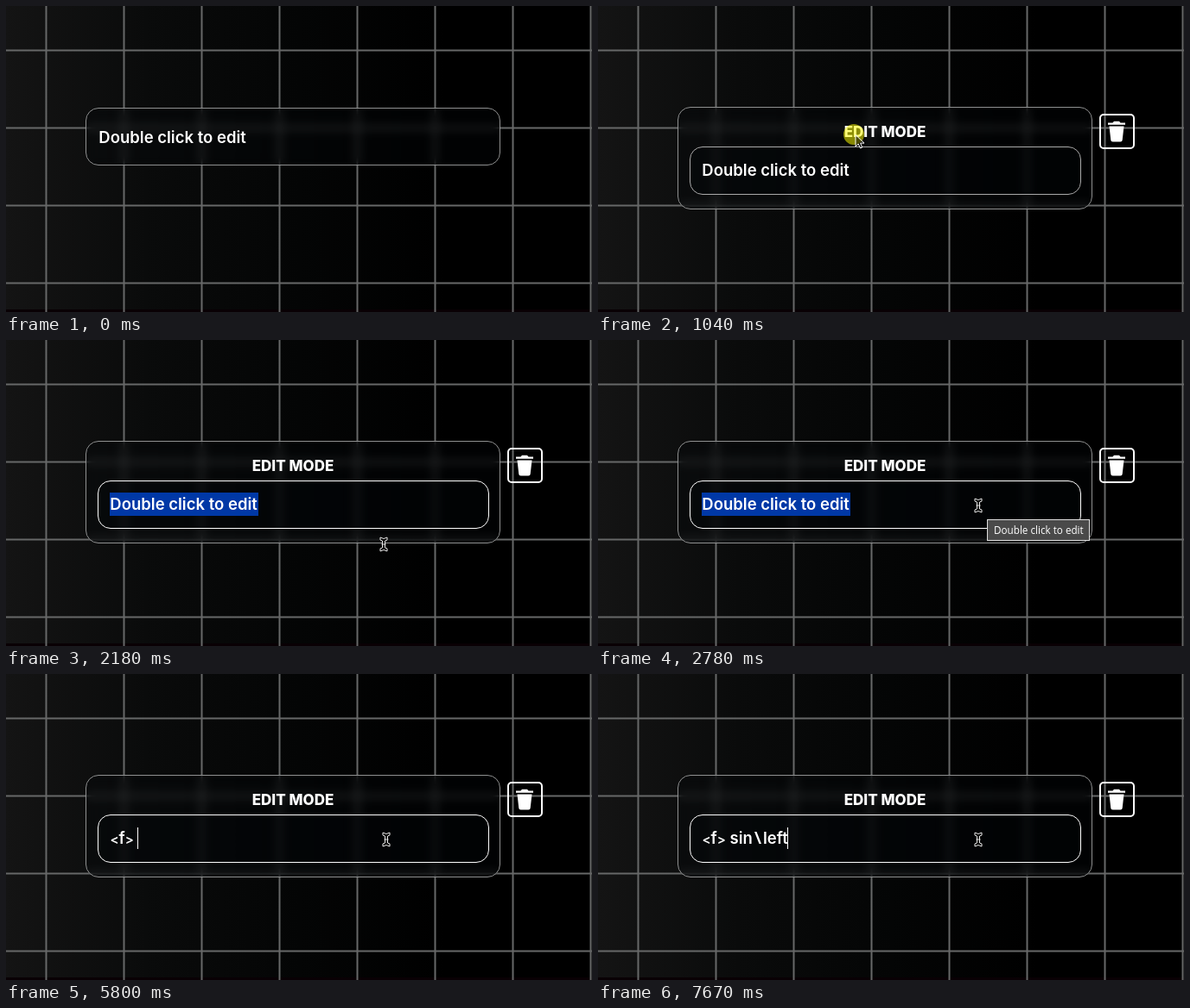
Recreate the animation shown at these times as an HTML page. Size 678 px wide and 355 px high, loop 8000 ms.

```html
<!DOCTYPE html>
<html lang="en">
<head>
<meta charset="utf-8">
<title>Edit mode</title>
<style>
html, body { margin: 0; width: 100%; height: 100%; overflow: hidden; background: #000; }
#stage {
  position: relative; width: 678px; height: 355px; overflow: hidden;
  background: linear-gradient(90deg, #141414 0, #0a0b0b 24%, #040505 50%, #000 75%);
}
#stage > svg { position: absolute; inset: 0; }
#stage div { position: absolute; box-sizing: border-box; }
#card {
  left: 92px; top: 118px; width: 480px; height: 67px;
  border: 1px solid #8f9090; border-radius: 15px;
  background: rgba(4, 6, 9, .35); backdrop-filter: blur(5.5px);
}
#card.edit { top: 117px; height: 119px; }
#field {
  left: 106px; top: 163px; width: 453px; height: 56px;
  border: 1px solid #fff; border-radius: 15px; background: rgba(5, 7, 9, .35);
}
#bin {
  left: 580px; top: 125px; width: 41px; height: 41px;
  border: 2px solid #fff; border-radius: 5px;
}
text { font-family: Inter, sans-serif; font-weight: 600; font-size: 18.5px; fill: #fff; white-space: pre; }
.angle { font-size: 15px; }
.slash { font-family: "Noto Sans Mono", monospace; font-size: 20px; }
#title { font-weight: 800; font-size: 17px; text-anchor: middle; }
#tip text { font: 11.7px "Open Sans", "Noto Sans", sans-serif; }
</style>
</head>
<body>
<div id="stage">
  <svg width="678" height="355">
    <path d="M0 353.5H678" stroke="#090004" stroke-width="3"/>
    <path id="grid" stroke="#676868" stroke-width="2"/>
  </svg>
  <div id="card"></div>
  <div id="field"></div>
  <div id="bin"></div>
  <svg width="678" height="355">
    <rect id="mark" y="177" height="27" fill="#0038a6"/>
    <text id="label">Double click to edit</text>
    <text id="typed" x="120.5" y="197"></text>
    <g id="editor">
      <text id="title" x="332" y="152">EDIT MODE</text>
      <path fill="#fff" d="M590 135.5h5.5l1.5-1.7h6l1.5 1.7h5.5v2.3h-20zM591.5 139.5h17l-1.8 16q-.2 2-2.2 2h-9q-2 0-2.2-2z"/>
    </g>
    <rect id="caret" y="178" width="1" height="25" fill="#fff"/>
    <g id="tip">
      <rect x="450.5" y="208.5" width="118" height="24" fill="#4a4a4a" stroke="#e0e0e0"/>
      <text x="458" y="225">Double click to edit</text>
    </g>
    <g id="pointer">
      <circle id="halo" cx="-1" r="12" fill="#ff0" fill-opacity=".53"/>
      <path id="arrow" d="M1 .5V14l3.2-3 2.3 5 2.3-1-2.2-4.9H11z" fill="#000" fill-opacity=".45" stroke="#fff"/>
      <path id="beam" d="M-4-8L0-6.5 4-8V-5L1.5-4V4L4 5V8L0 6.5-4 8V5L-1.5 4V-4L-4-5ZM-2.5 0H2.5" fill="#000" stroke="#e8e8e8"/>
    </g>
  </svg>
</div>
<script>
const LOOP = 8000, BLINK = 530, STEP = 70;
const EDIT = 1040, FOCUS = 1470, WORD = 1700, ALL = 1970, CLEAR = 2980;
const $ = id => document.getElementById(id);
const show = (id, on) => { $(id).style.display = on ? "" : "none"; };
const within = (t, a, b) => t >= a && t < b;

let lines = "";
for (let i = 0; i < 8; i++) lines += `M${46.5 + 90 * i} 0V355M0 ${51.5 + 90 * i}H678`;
$("grid").setAttribute("d", lines);

// each move: start, end, target point
const entry = [336, 304];
const moves = [
  { from: 260, to: 660, end: [297, 149] },
  { from: 1170, to: FOCUS, end: [280, 188] },
  { from: ALL, to: 2180, end: [437, 237] },
  { from: 2180, to: 2320, end: [440, 192] }
];
const clicks = [[730, 830], [900, 1170], [FOCUS, 1570], [WORD, 1770]];

// each burst of typing: text, first key, time between keys
const bursts = [["<f>", 3520, 235], [" ", 4740, 0], ["sin\\", 6430, 190], ["left", 7270, 133]];
const keys = bursts.flatMap(([text, first, gap]) =>
  [...text].map((char, i) => ({ char, time: first + i * gap })));

function pointerAt(t) {
  let [x, y] = entry;
  for (const { from, to, end } of moves) {
    const steps = Math.round((to - from) / STEP);
    const part = Math.min(1, Math.max(0, (t - from) / (to - from)));
    const k = Math.floor(part * steps) / steps, ease = k * (2 - k);
    x += (end[0] - x) * ease;
    y += (end[1] - y) * ease;
  }
  return [x, y];
}

function drawPointer(t) {
  const [x, y] = pointerAt(t), beam = t > EDIT && y > 163;
  show("pointer", t >= moves[0].from);
  $("pointer").setAttribute("transform", `translate(${x} ${y})`);
  show("halo", clicks.some(([a, b]) => within(t, a, b)));
  show("arrow", !beam);
  show("beam", beam);
}

function glyph(char) {
  const el = document.createElementNS("http://www.w3.org/2000/svg", "tspan");
  if ("<>".includes(char)) el.classList.add("angle");
  if (char === "\\") el.classList.add("slash");
  el.textContent = char;
  return el;
}

function drawLabel(t) {
  const edit = t >= EDIT, all = t >= ALL;
  show("label", t < CLEAR);
  $("label").setAttribute("x", edit ? 120.3 : 107.3);
  $("label").setAttribute("y", edit ? 197 : 159);
  show("mark", within(t, WORD, CLEAR));
  $("mark").setAttribute("x", all ? 120 : 258);
  $("mark").setAttribute("width", all ? 172 : 34);
}

function drawTyping(t) {
  const done = keys.filter(k => k.time <= t);
  const typed = $("typed");
  if (typed.childElementCount !== done.length) {
    typed.replaceChildren(...done.map(k => glyph(k.char)));
  }
  const last = done.length ? done[done.length - 1].time : CLEAR;
  const lit = Math.floor((t - last) / BLINK) % 2 === 0;
  show("caret", within(t, 1570, WORD) || (t >= CLEAR && lit));
  const end = done.length ? typed.getComputedTextLength() : 0;
  $("caret").setAttribute("x", t < WORD ? 280 : Math.round(120 + end));
}

function draw(now) {
  const t = now % LOOP, edit = t >= EDIT;
  $("card").className = edit ? "edit" : "";
  ["field", "bin", "editor"].forEach(id => show(id, edit));
  $("field").style.borderColor = t < FOCUS ? "#aaa" : "#fff";
  show("tip", within(t, 2780, 3120));
  $("tip").setAttribute("opacity", t < 3050 ? 1 : .5);
  drawLabel(t);
  drawTyping(t);
  drawPointer(t);
}

const start = performance.now();
function tick() {
  draw(performance.now() - start);
  requestAnimationFrame(tick);
}
tick();
</script>
</body>
</html>
```
